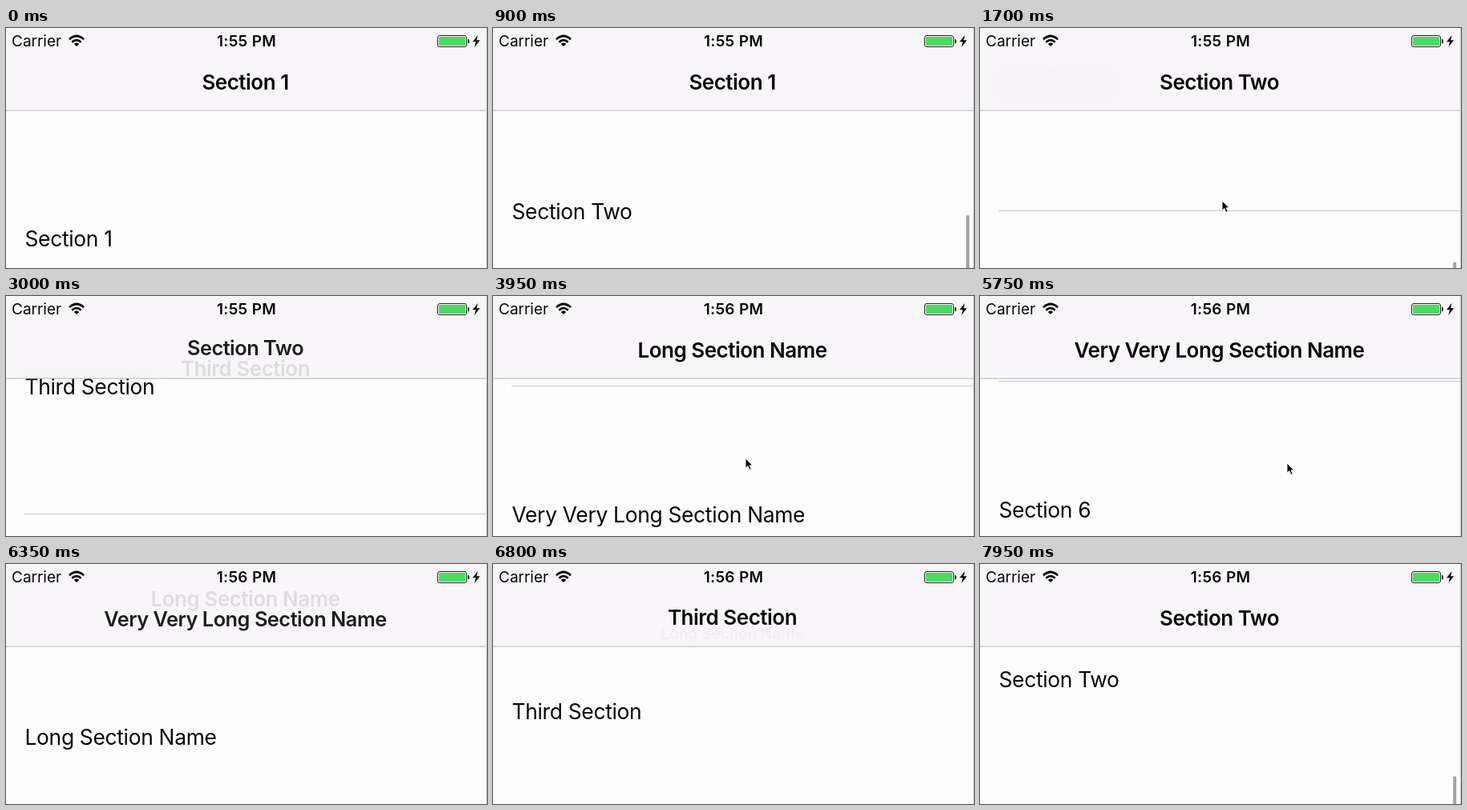
Animation, 600 px wide and 300 px high, one loop 8000 ms. Source, as an HTML page:

```html
<!DOCTYPE html>
<html lang="en">
<head>
<meta charset="utf-8">
<title>Scrolling section titles</title>
<style>
  html, body { margin: 0; width: 100%; height: 100%; overflow: hidden; background: #fefdfe; }
  svg { display: block; width: 600px; height: 300px; }
  text { font-family: Inter, "Open Sans", sans-serif; font-optical-sizing: none; fill: #060606; }
  .label { font-size: 26.4px; letter-spacing: -.012em; }
  .title { font-size: 26px; font-weight: 600; letter-spacing: -.019em; text-anchor: middle; }
  .status { font-size: 19px; }
  .clock { font-weight: 600; letter-spacing: .3px; text-anchor: middle; }
  .blurred { filter: blur(18px); opacity: .15; }
</style>
</head>
<body>
<svg viewBox="0 0 600 300">
  <defs>
    <clipPath id="barClip"><rect width="600" height="103"/></clipPath>
  </defs>
  <rect width="600" height="300" fill="#fefdfe"/>
  <g id="rows"></g>
  <rect id="indicator" x="590.2" width="4" height="350" rx="2" fill="#000" opacity=".36"/>

  <rect width="600" height="103" fill="#f8f6f9"/>
  <g clip-path="url(#barClip)"><g id="shadows" class="blurred"></g></g>
  <rect y="102.6" width="600" height="1" fill="#b4b3b6"/>
  <text id="oldTitle" class="title" y="9.3"></text>
  <text id="newTitle" class="title" y="9.3"></text>

  <text class="status" x="7" y="23.4">Carrier</text>
  <g fill="none" stroke="#060606" stroke-width="2.7">
    <path d="M79 14.2Q88 5.8 97 14.2"/>
    <path d="M82.3 17.7Q88 12.6 93.7 17.7"/>
    <path d="M88 23L84.9 19.9Q88 17.3 91.1 19.9Z" fill="#060606" stroke="none"/>
  </g>
  <text id="clock" class="status clock" x="300" y="23.4"></text>
  <rect x="538.5" y="9.5" width="36" height="14" rx="2.5" fill="#f8f6f9" stroke="#222"/>
  <rect x="540" y="11" width="33" height="11" rx="1" fill="#4cd964"/>
  <path d="M576 13.5Q578 14 578 16.5T576 19.5Z" fill="#222"/>
  <path d="M588.5 9L582 17.3H586L584.3 24L591.2 15.2H587.1Z" fill="#060606"/>

  <rect x="599" width="1" height="300" fill="#c6c6c8"/>
  <path id="cursor" d="M0 0V12.2L2.9 9.6L5 14.4L7.2 13.4L5.1 8.8H8.8Z" fill="#060606" stroke="#fff" stroke-width=".9"/>
</svg>
<script>
const LOOP = 8000, STEP = 50, FADE = 280, MINUTE = 3700;
const ROW = 320, EDGE = 144; // row height; offset at which the first label meets the bar
const names = ["Section 1", "Section Two", "Third Section", "Long Section Name",
  "Very Very Long Section Name", "Section 6"];

// Key points of the flicks: [time, scroll offset]
const flicks = [[0, 0], [100, 0], [700, 280], [1300, 466], [1700, 514], [2200, 690],
  [2650, 765], [3000, 790], [3450, 890], [3650, 1110], [3950, 1270], [4400, 1426],
  [5150, 1592], [5900, 1596], [6550, 783], [6800, 719], [7250, 462], [8000, 439]];

// The pointer rises into view to (x, y), then drops out again.
const visits = [
  { from: 1350, to: 1850, x: 302, y: 216 },
  { from: 3700, to: 4150, x: 315, y: 203 },
  { from: 4950, to: 6050, x: 383, y: 209 }
];

const $ = id => document.getElementById(id);
const ease = u => u * u * (3 - 2 * u);

function add(parent, tag, attrs, text = "") {
  const node = document.createElementNS("http://www.w3.org/2000/svg", tag);
  for (const key in attrs) node.setAttribute(key, attrs[key]);
  node.textContent = text;
  parent.append(node);
}

names.forEach((name, i) => {
  const label = { class: "label", x: 23.5, y: 272.5 + ROW * i };
  add($("rows"), "text", label, name);
  add($("shadows"), "text", label, name);
  add($("rows"), "rect", { x: 23, y: 102 + ROW * (i + 1), width: 577, height: 1, fill: "#c8c7cc" });
});

// Monotone cubic interpolation between the key points.
function offsetAt(t) {
  const last = flicks.length - 2;
  let i = 0;
  while (i < last && t >= flicks[i + 1][0]) i++;
  const slope = k => k < 0 || k > last ? 0
    : (flicks[k + 1][1] - flicks[k][1]) / (flicks[k + 1][0] - flicks[k][0]);
  const tangent = k => {
    const a = slope(k - 1), b = slope(k);
    return a * b > 0 ? 2 * a * b / (a + b) : 0;
  };
  const [t0, s0] = flicks[i], [t1, s1] = flicks[i + 1];
  const u = (t - t0) / (t1 - t0), v = 1 - u;
  return s0 * ease(v) + s1 * ease(u) + (t1 - t0) * u * v * (v * tangent(i) - u * tangent(i + 1));
}

// The bar takes the name of each label that crosses its lower edge, in either direction.
function findTitles() {
  const found = [{ start: -FADE, section: 0 }];
  const passed = t => Math.floor((offsetAt(t) - EDGE) / ROW);
  for (let t = STEP; t < LOOP; t += STEP) {
    const before = passed(t - STEP), now = passed(t);
    const section = Math.max(before, now);
    if (before !== now && section !== found.at(-1).section) found.push({ start: t - STEP / 10, section });
  }
  return found;
}
const titles = findTitles();

function placeTitle(node, name, dy, scale, opacity) {
  node.textContent = name;
  node.setAttribute("transform", `translate(298.5 ${67.2 + dy}) scale(${scale})`);
  node.setAttribute("opacity", opacity);
}

function drawTitles(t) {
  const i = titles.findLastIndex(({ start }) => t >= start);
  const now = titles[i].section, before = i ? titles[i - 1].section : now;
  // A change is first seen one step after the crossing begins.
  const p = ease(Math.min(1, (t - titles[i].start) / FADE));
  const way = now >= before ? 1 : -1;
  placeTitle($("newTitle"), names[now], way * 25.6 * (1 - p), 1, p);
  placeTitle($("oldTitle"), names[before], -way * 20 * p, 1 - .25 * p, 1 - p);
}

function drawCursor(t) {
  const visit = visits.find(({ from, to }) => t >= from && t <= to);
  $("cursor").setAttribute("visibility", visit ? "visible" : "hidden");
  if (!visit) return;
  const { from, to, x, y } = visit;
  const rise = ease(Math.min(1, (t - from) / 250, (to - t) / 150));
  $("cursor").setAttribute("transform", `translate(${x} ${302 + (y - 302) * rise})`);
}

function draw(t) {
  const offset = Math.round(offsetAt(t));
  for (const id of ["rows", "shadows"]) $(id).setAttribute("transform", `translate(0 ${-offset})`);
  $("indicator").setAttribute("y", 104.5 + .366 * offset);
  $("indicator").setAttribute("visibility", t < 100 ? "hidden" : "visible");
  $("clock").textContent = t < MINUTE ? "1:55 PM" : "1:56 PM";
  drawTitles(t);
  drawCursor(t);
}

const begin = performance.now();
function tick() {
  const t = (performance.now() - begin) % LOOP;
  draw(Math.floor(t / STEP) * STEP);
  requestAnimationFrame(tick);
}
tick();
</script>
</body>
</html>
```
